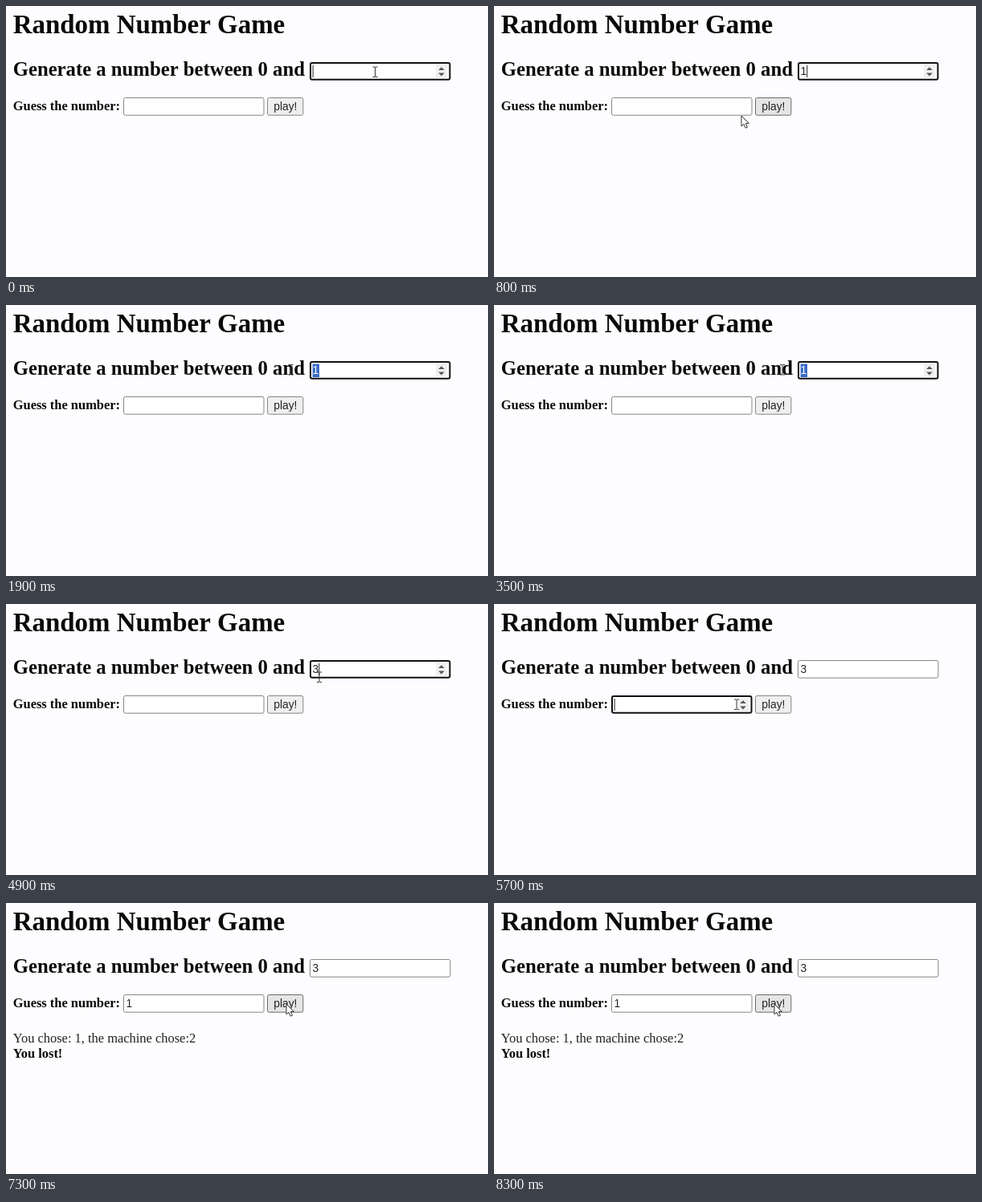
Write an HTML page with a canvas that moves like this. It is 600 px wide and 338 px high and loops after 8.4 s.

```html
<!DOCTYPE html>
<html lang="en">
<head>
<meta charset="utf-8">
<title>Random Number Game</title>
<style>
  html, body { margin: 0; width: 100%; height: 100%; overflow: hidden; background: #fdfcfe; }
  canvas { display: block; width: 600px; height: 338px; }
</style>
</head>
<body>
<canvas id="stage" width="600" height="338"></canvas>
<script>
const ctx = document.getElementById('stage').getContext('2d');
const LOOP = 8400, STEP = 100, GLIDE = 300, LEFT = 8.7;
const INK = '#0a0a0a', SOFT = '#222', PAPER = '#fdfcfe';
const SERIF = '"Liberation Serif", "Times New Roman", serif';
const SANS = '13.8px "Liberation Sans", Arial, sans-serif';

const control = (x, y, w) => ({ x, y, w, h: 22.7 });
const limit = control(378, 70, 175.5);
const guess = control(146, 114, 175.5);
const play = control(325, 114, 45.3);
const heading = { x: 8, y: 66, w: 364, h: 26 };

// each glide: when it begins and where it ends
const home = { x: 459.5, y: 82 };
const glides = [
  { at: 100, x: 352, y: 126 },
  { at: 400, x: 308, y: 137 },
  { at: 1100, x: 398, y: 82 },
  { at: 1600, x: 354.5, y: 80.5 },
  { at: 2200, x: 359, y: 80.5 },
  { at: 4300, x: 390, y: 91 },
  { at: 5200, x: 302, y: 125 },
  { at: 6000, x: 358, y: 130 },
  { at: 6900, x: 349, y: 126 }
];

function pointerAt(t) {
  return glides.reduce((p, g) => {
    const k = Math.min(1, Math.max(0, (t - g.at) / GLIDE));
    const e = k * k * (3 - 2 * k);
    return { x: p.x + (g.x - p.x) * e, y: p.y + (g.y - p.y) * e };
  }, home);
}

const inside = (p, r) => p.x >= r.x && p.x <= r.x + r.w && p.y >= r.y && p.y <= r.y + r.h;

function text(str, x, y, font, color = INK) {
  ctx.font = font;
  ctx.fillStyle = color;
  ctx.fillText(str, x, y);
}

function box(r, fill, stroke, line) {
  ctx.beginPath();
  ctx.roundRect(r.x + line / 2, r.y + line / 2, r.w - line, r.h - line, 2);
  ctx.fillStyle = fill;
  ctx.fill();
  ctx.strokeStyle = stroke;
  ctx.lineWidth = line;
  ctx.stroke();
}

function spinner(r) {
  const x = r.x + r.w - 11.5, y = r.y + 11.8;
  ctx.fillStyle = '#f1f0f1';
  ctx.fillRect(x - 7, r.y + 3, 14.5, r.h - 6);
  ctx.fillStyle = '#555';
  for (const dir of [-1, 1]) {
    ctx.beginPath();
    ctx.moveTo(x - 3.8, y + dir * 1.8);
    ctx.lineTo(x, y + dir * 5.6);
    ctx.lineTo(x + 3.8, y + dir * 1.8);
    ctx.fill();
  }
}

function field(r, value, focused, selected, caret) {
  box(r, '#fff', focused ? '#111113' : '#858585', focused ? 2 : 1);
  if (focused) spinner(r);
  const x = r.x + 3.6;
  if (selected) {
    ctx.fillStyle = '#3a6bc8';
    ctx.fillRect(x, r.y + 3.5, 8.4, 16.5);
  }
  text(value, x, r.y + 16.3, SANS, selected ? '#fff' : SOFT);
  if (focused && caret && !selected) {
    ctx.fillStyle = SOFT;
    ctx.fillRect(x + ctx.measureText(value).width, r.y + 4, 1, 15);
  }
}

function arrow({ x, y }) {
  ctx.save();
  ctx.translate(x, y);
  const shape = new Path2D('M0 0V13L3 10.3L5.2 15.2L7.4 14.2L5.3 9.5L9.3 9.3Z');
  ctx.fillStyle = '#fff';
  ctx.fill(shape);
  ctx.strokeStyle = '#333';
  ctx.lineWidth = 1;
  ctx.lineJoin = 'round';
  ctx.stroke(shape);
  ctx.restore();
}

function beam({ x, y }) {
  ctx.fillStyle = '#333';
  ctx.fillRect(x - 0.5, y - 6, 1, 12.5);
  for (const top of [y - 6.5, y + 6]) {
    ctx.fillRect(x - 3, top, 2.5, 1);
    ctx.fillRect(x + 0.5, top, 2.5, 1);
  }
}

function draw(t) {
  ctx.fillStyle = PAPER;
  ctx.fillRect(0, 0, 600, 338);
  text('Random Number Game', LEFT, 33.6, `bold 32.95px ${SERIF}`);
  text('Generate a number between 0 and', LEFT, 86.6, `bold 24.72px ${SERIF}`);
  text('Guess the number:', LEFT, 129.6, `bold 16.45px ${SERIF}`);

  const max = t < 400 ? '' : t < 4300 ? '1' : '3';
  const pick = t < 6900 ? '' : '1';
  const caret = t % 1000 < 500 || t % 800 < 200;
  field(limit, max, t < 5700, t >= 1700 && t < 4300, caret);
  field(guess, pick, t >= 5700 && t < 7200, false, caret);

  // the button's shade trails the pointer slightly
  const hover = inside(pointerAt(t - GLIDE), play);
  box(play, hover ? '#e5e4e6' : '#efeef0', hover ? '#6a6a6a' : '#858585', 1);
  text('play!', 333.3, 130.3, SANS, SOFT);

  if (t >= 7200) {
    text('You chose: 1, the machine chose:2', LEFT, 174, `16.45px ${SERIF}`, SOFT);
    text('You lost!', LEFT, 193, `bold 16.45px ${SERIF}`);
  }
  const p = pointerAt(t);
  const overText = [limit, guess, heading].some(r => inside(p, r));
  (overText ? beam : arrow)(p);
}

const start = performance.now();
function tick() {
  const t = (performance.now() - start) % LOOP;
  draw(Math.floor(t / STEP) * STEP);
  requestAnimationFrame(tick);
}
tick();
</script>
</body>
</html>
```
